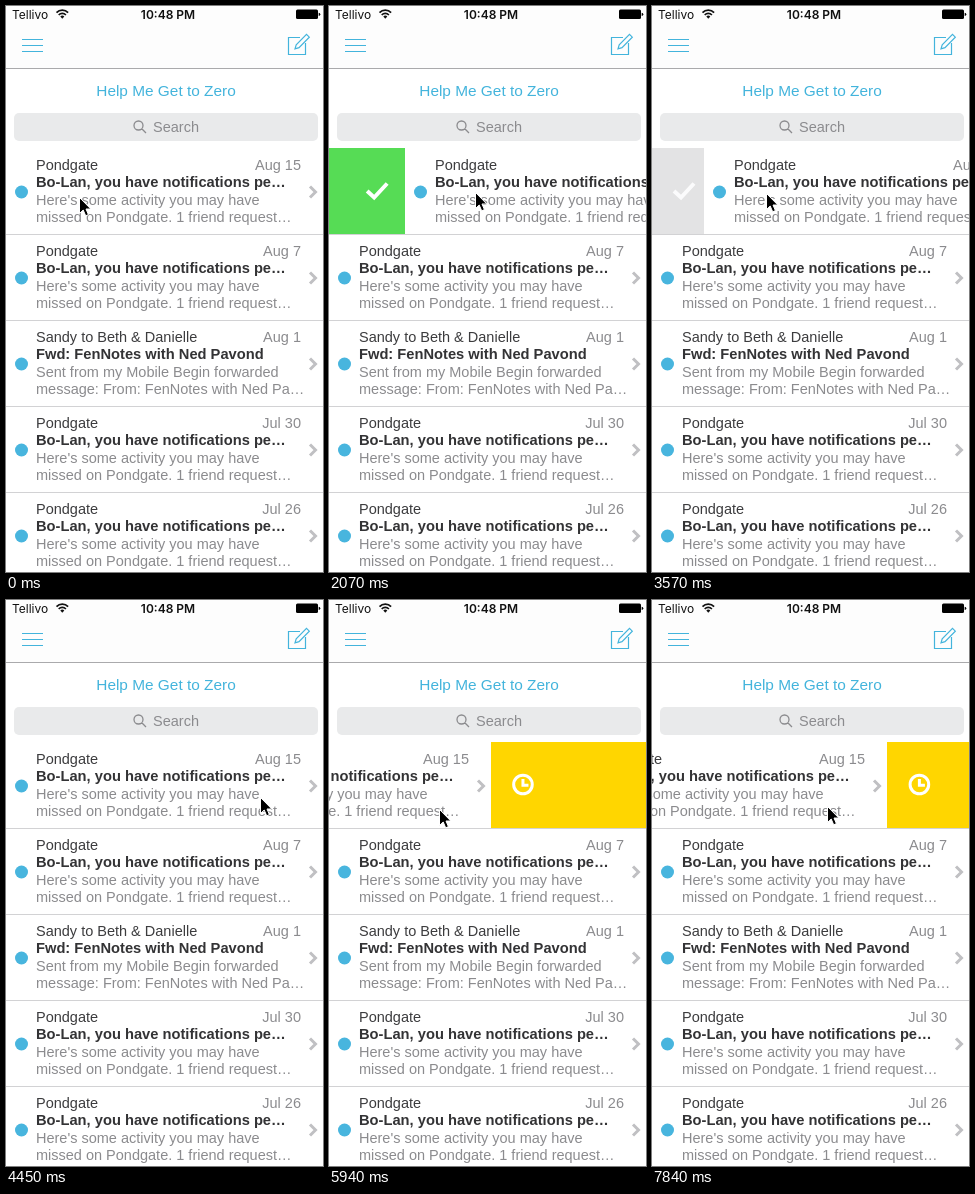
Write an HTML page that moves like this. It is 317 by 566 pixels and loops after 7990 ms.

```html
<!DOCTYPE html>
<html lang="en">
<head>
<meta charset="utf-8">
<title>Inbox swipe</title>
<style>
  html, body { margin: 0; width: 100%; height: 100%; overflow: hidden; background: #fff; }
  svg { display: block; width: 317px; height: 566px; }
  text { font: 14.5px "Liberation Sans", Arial, sans-serif; fill: #8b8b8e; }
  .from { fill: #3c3c3e; }
  .subject { font-size: 14.7px; font-weight: bold; fill: #333335; }
  .date { text-anchor: end; }
  .status { font: 12px Inter, sans-serif; fill: #111; }
  .clock { font-weight: 600; text-anchor: middle; }
  .help { font-size: 15.4px; fill: #43b4dc; text-anchor: middle; }
  .blue { fill: none; stroke: #43b4dc; stroke-width: 1.2; }
  .lens { fill: none; stroke: #8b8b8e; stroke-width: 1.3; }
  .icon { fill: none; stroke: #fff; stroke-width: 4; }
  .thin { stroke-width: 3; }
</style>
</head>
<body>
<svg viewBox="0 0 317 566">
  <rect width="317" height="566" fill="#fff"/>
  <rect width="317" height="62" fill="#fdfdfd"/>

  <text class="status" x="6" y="12.5">Tellivo</text>
  <g fill="none" stroke="#111" stroke-width="1.7">
    <path d="M50.5 6.7a8 8 0 0 1 11.6 0M52.7 9a5 5 0 0 1 7.2 0"/>
    <path d="M56.3 12.7l-2-2.1a2.8 2.8 0 0 1 4 0z" fill="#111" stroke="none"/>
  </g>
  <text class="status clock" x="162" y="12.5">10:48 PM</text>
  <rect x="290" y="3.5" width="22" height="9.5" rx="1.5"/>
  <path d="M312.7 6.7a1.6 1.6 0 0 1 0 3.2z"/>

  <path class="blue" style="stroke-width:1" d="M16 33.5h21M16 39.5h21M16 45.5h21"/>
  <path class="blue" d="M294 31.5H282.5V48.5H299.5V37"/>
  <path class="blue" d="M289 42.8l1.2-4L300.5 28.4l2.8 2.8L293 41.6z"/>
  <path d="M0 62.5h317" stroke="#aaaaac"/>

  <text class="help" x="160" y="89.6">Help Me Get to Zero</text>
  <rect x="8" y="107" width="304" height="28" rx="5" fill="#e9eaeb"/>
  <path class="lens" d="M135.8 122.8l4.2 4.2M137 119.5a4.5 4.5 0 1 1-9 0a4.5 4.5 0 1 1 9 0"/>
  <text x="147" y="126">Search</text>

  <g id="list"></g>

  <rect id="back" y="142" width="317" height="86"/>
  <g id="icons">
    <path class="icon" d="M-10 .5L-3 7L10-7"/>
    <path class="icon" d="M-8-8L8 8M8-8L-8 8"/>
    <path class="icon thin" d="M9.3 0a9.3 9.3 0 1 1-18.6 0a9.3 9.3 0 1 1 18.6 0M0-5.5V.7H5.5"/>
    <path class="icon thin" d="M-10-6.5h3M-4-6.5h14M-10 0h3M-4 0h14M-10 6.5h3M-4 6.5h14"/>
  </g>
  <g id="top"></g>
  <path id="cursor" d="M0 0V16L3.7 12.5L6.2 18.3L8.9 17.1L6.5 11.5H11.3Z" stroke="#fff"/>
</svg>
<script>
const $ = id => document.getElementById(id);
const LOOP = 7990, STEP = 147.95, WIDTH = 317, ROW = 86, TOP = 142;
const NEAR = 60, FAR = 180, PEAK = 240, SPEED = 27.2;

const notice = date => ["Pondgate", date, "Bo-Lan, you have notifications pe…",
  "Here's some activity you may have", "missed on Pondgate. 1 friend request…"];
const mails = [
  notice("Aug 15"),
  notice("Aug 7"),
  ["Sandy to Beth &amp; Danielle", "Aug 1", "Fwd: FenNotes with Ned Pavond",
    "Sent from my Mobile Begin forwarded", "message: From: FenNotes with Ned Pa…"],
  notice("Jul 30"),
  notice("Jul 26")
];

const row = ([from, date, subject, a, b]) => `
  <circle cx="15.5" cy="44" r="6.5" fill="#48b5de"/>
  <text class="from" x="30" y="22">${from}</text>
  <text class="date" x="295" y="22">${date}</text>
  <text class="subject" x="30" y="39.3">${subject}</text>
  <text x="30" y="57">${a}</text>
  <text x="30" y="74">${b}</text>
  <path d="M304 38.5l5.5 5.5l-5.5 5.5" fill="none" stroke="#c0c0c3" stroke-width="3"/>`;

$("list").innerHTML = mails.map((mail, i) =>
  `<g transform="translate(0 ${TOP + ROW * i})">${i ? row(mail) : ""}
   <path d="M0 86.5h317" stroke="#d2d2d4"/></g>`).join("");
$("top").innerHTML = `<rect width="${WIDTH}" height="${ROW}" fill="#fff"/>` + row(mails[0]);

const clamp = (v, max = 1) => Math.max(0, Math.min(max, v));

// Steady pull to the peak, a short hold, then a quick drag back.
function pull(n) {
  const back = clamp((n - 11.9) / 3);
  return clamp(SPEED * (n - 1.2), PEAK) * (1 - back * back * (3 - 2 * back));
}

const offset = step => pull(step - 10) - pull(step - 33.1) - pull(step - 48.8);

// Where the pointer holds the row: [step, x, y]
const grip = [[0, 73, 191], [2, 73, 191], [4, 55, 186], [10, 55, 186], [14, 70, 188],
  [24, 62, 188], [30, 254, 197], [33, 262, 196], [48, 268, 196], [53, 257, 196]];

function gripAt(step) {
  const i = Math.max(1, grip.findIndex(g => g[0] >= step));
  const a = grip[i - 1], b = grip[i];
  const f = (step - a[0]) / (b[0] - a[0]);
  return [a[1] + (b[1] - a[1]) * f, a[2] + (b[2] - a[2]) * f];
}

const colors = ["#56dc55", "#f75400", "#ffd600", "#d8a675"];
const place = (el, x, y) => el.setAttribute("transform", `translate(${x} ${y})`);

function draw(now) {
  const step = Math.min(53, Math.floor((now % LOOP + 8) / STEP));
  const shift = offset(step), left = shift < 0;
  const dist = Math.abs(shift), reach = Math.max(dist, NEAR);
  const kind = (left ? 2 : 0) + (dist > FAR ? 1 : 0);
  const [x, y] = gripAt(step);
  const drift = left ? 14 * (1 - Math.exp(shift / 60)) : -0.02 * shift;

  $("back").setAttribute("fill", dist < NEAR ? "#e3e3e4" : colors[kind]);
  [...$("icons").children].forEach((el, i) => el.style.display = i === kind ? "" : "none");
  $("icons").setAttribute("opacity", clamp(dist / NEAR));
  place($("icons"), left ? WIDTH - reach + 32 : reach - 28, 184.5);
  place($("top"), Math.round(shift), TOP);
  place($("cursor"), Math.round(x + shift) + 0.5, Math.round(y + drift) + 0.5);
}

function tick() {
  draw(performance.now());
  requestAnimationFrame(tick);
}
tick();
</script>
</body>
</html>
```
